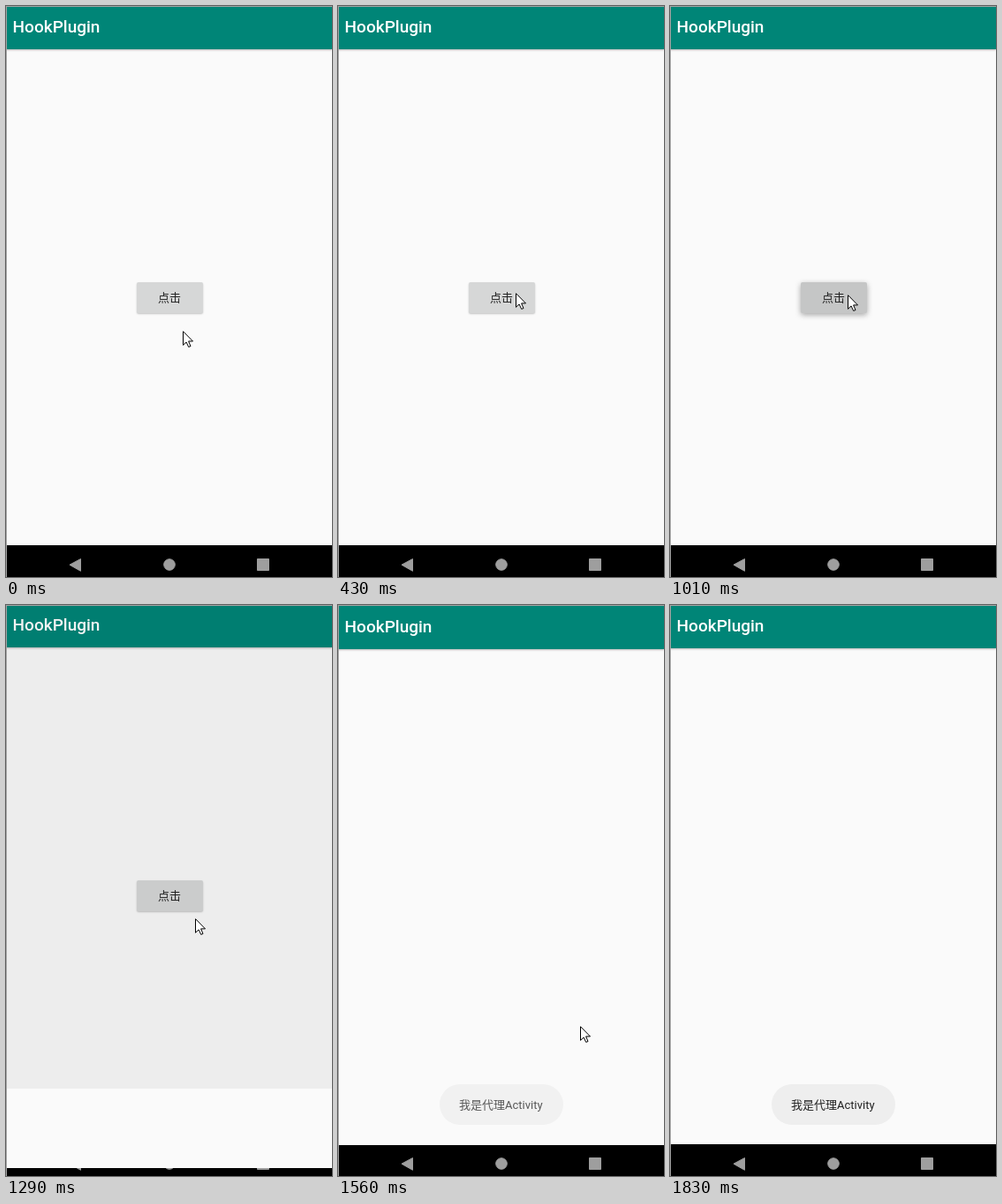
An HTML page for the animation above (2.36 s loop, 369x647 px).

```html
<!DOCTYPE html>
<html lang="zh-CN">
<head>
<meta charset="utf-8">
<title>HookPlugin</title>
<style>
  html, body { margin: 0; width: 100%; height: 100%; overflow: hidden; background: #000; }
  #stage {
    position: relative; width: 369px; height: 647px; overflow: hidden; background: #000;
    font-family: Roboto, "Noto Sans CJK SC", "Noto Sans CJK", sans-serif;
  }
  #stage * { position: absolute; box-sizing: border-box; white-space: nowrap; }
  .page { left: 0; top: 0; width: 369px; height: 611px; overflow: hidden; background: #fafafa; }
  .bar {
    left: 0; top: 0; width: 100%; height: 49px; background: #008577;
    box-shadow: 0 1px 2px rgba(0, 0, 0, .28);
  }
  .bar span { left: 7.6px; top: 13px; font: 500 19px/22px Roboto, sans-serif; color: #fff; }
  #button {
    left: 148px; top: 313px; width: 75px; height: 35px; border-radius: 2px;
    background: #d6d7d7; box-shadow: 0 1px 2px rgba(0, 0, 0, .22);
  }
  #button.down { background: #c5c6c6; box-shadow: 0 2px 6px rgba(0, 0, 0, .34); }
  #dim { inset: 0; background: #000; }
  #toast {
    left: 115px; top: 543px; width: 140px; height: 46px; border-radius: 23px; background: #eee;
  }
  svg { left: 0; top: 0; }
  svg text { font-size: 13px; fill: #222; }
  #edge { inset: 0; border: solid #a3a3a3; border-width: 1px 0 0 1px; }
</style>
</head>
<body>
<div id="stage">
  <svg width="369" height="647" fill="#9e9e9e" stroke="#9e9e9e" stroke-linejoin="round">
    <path d="M72 633.2L84.5 626.5V640.3Z"/>
    <circle cx="185" cy="633" r="6.3"/>
    <rect x="284.5" y="626.5" width="13" height="13"/>
  </svg>
  <div class="page" id="home">
    <div class="bar"><span>HookPlugin</span></div>
    <div id="button"><svg width="75" height="35"><text x="37" y="22" text-anchor="middle">点击</text></svg></div>
    <div id="dim"></div>
  </div>
  <div class="page" id="next">
    <div class="bar"><span>HookPlugin</span></div>
  </div>
  <div id="toast"><svg width="140" height="46"><text x="22" y="28">我是代理Activity</text></svg></div>
  <svg id="cursor" width="14" height="21">
    <path d="M.5 .7V16.3L4.1 12.9L6.7 18.4L9 17.5L6.6 11.9H11.5Z" fill="#fff" stroke="#000"/>
  </svg>
  <div id="edge"></div>
</div>
<script>
  const LOOP = 2360;
  const $ = id => document.getElementById(id);
  const [home, next, button, dim, toast, cursor] =
    ['home', 'next', 'button', 'dim', 'toast', 'cursor'].map($);

  // Each step holds until the following one; "clip" is the stage y where the new page begins.
  const steps = [
    { at: 0, mouse: [200, 368] },
    { at: 160, mouse: [200, 362] },
    { at: 300, mouse: [200, 343] },
    { at: 430, mouse: [201, 325] },
    { at: 700, mouse: [201, 327] },
    { at: 1010, mouse: [201, 327], down: true },
    { at: 1290, mouse: [214, 355], homeY: -1, shade: .05, nextY: 27, clip: 548 },
    { at: 1440, mouse: [260, 433], homeY: -10, shade: .1, nextY: 7, clip: 19, toastA: .45 },
    { at: 1560, mouse: [274, 477], homeY: -11, shade: .1, nextY: 1, clip: 0, toastA: .74 },
    { at: 1680, mouse: [293, 527], nextY: 0, clip: 0, toastA: .93 },
    { at: 1830, nextY: 0, clip: 0, toastA: 1 }
  ];

  const move = (el, x, y) => el.style.transform = `translate(${x}px, ${y}px)`;
  const show = (el, on) => el.style.visibility = on ? 'visible' : 'hidden';

  function draw({ mouse, down = false, homeY = 0, shade = 0, nextY, clip, toastA = 0 }) {
    show(cursor, mouse);
    if (mouse) move(cursor, ...mouse);
    button.classList.toggle('down', down);
    move(home, 0, homeY);
    dim.style.opacity = shade;
    show(next, nextY !== undefined);
    if (nextY !== undefined) {
      move(next, 0, nextY);
      next.style.clipPath = `inset(${Math.max(0, clip - nextY)}px 0 0 0)`;
    }
    toast.style.opacity = toastA;
  }

  const start = performance.now();
  let current;
  function tick() {
    const t = (performance.now() - start) % LOOP;
    const step = steps.filter(s => s.at <= t).pop();
    if (step !== current) draw(current = step);
    requestAnimationFrame(tick);
  }
  tick();
</script>
</body>
</html>
```
